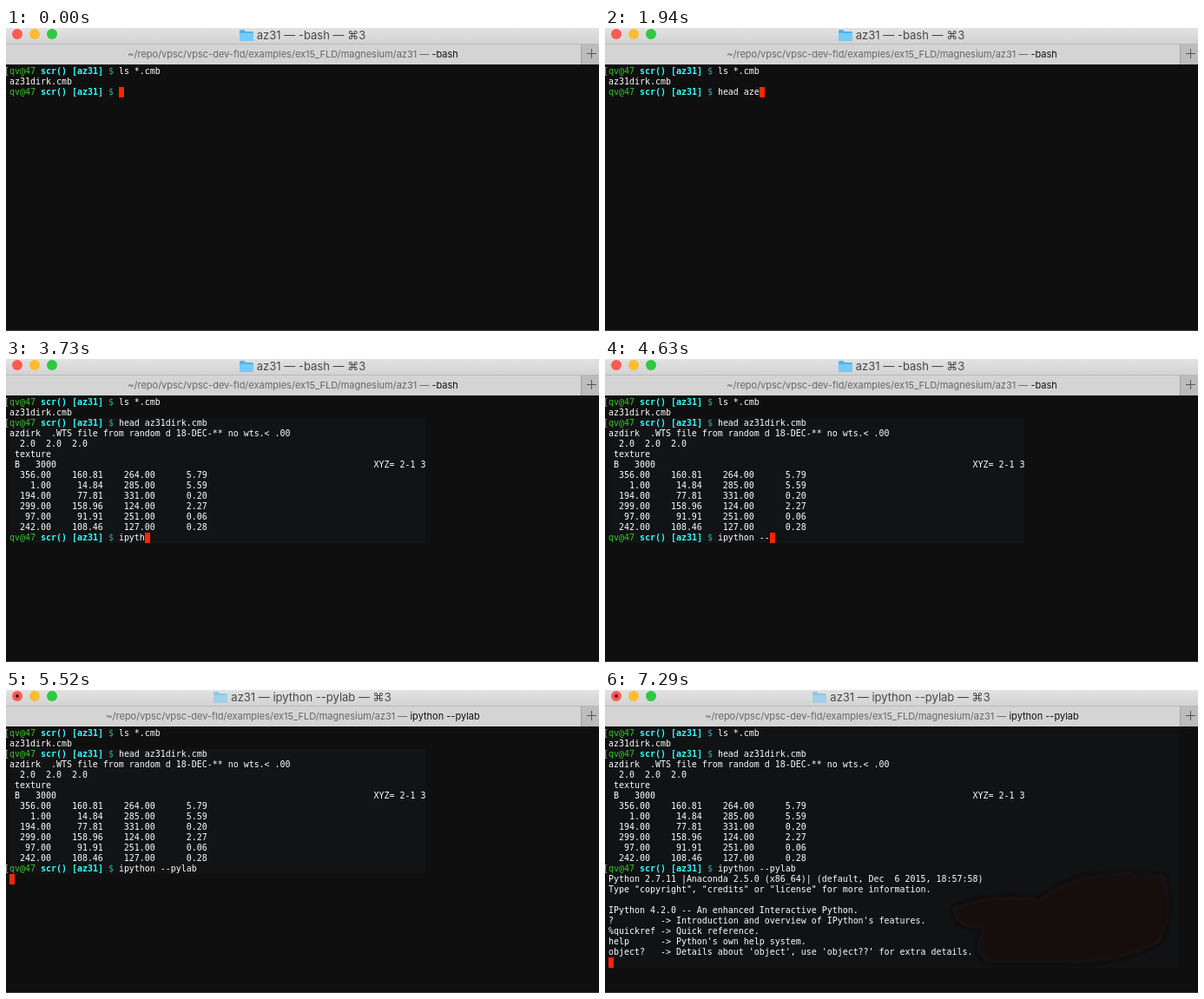
An HTML page that plays this animation: 683x349 px, repeating every 8 s.

```html
<!DOCTYPE html>
<html lang="en">
<head>
<meta charset="utf-8">
<title>Terminal session</title>
<style>
html, body { margin: 0; width: 100%; height: 100%; overflow: hidden; background: #0f0f0f; }
#window { position: absolute; left: 0; top: 0; width: 683px; height: 349px; overflow: hidden; }
svg { position: absolute; left: 0; top: 0; }
#title, #tab { position: absolute; left: 0; text-align: center; white-space: pre; font-family: Inter, "Open Sans", sans-serif; }
#title { top: -1px; width: 683px; font-size: 13px; line-height: 18px; color: #484848; }
#title svg { position: static; vertical-align: -2px; margin-right: 4px; }
#tab { top: 21px; width: 661px; font-size: 11px; line-height: 18px; color: #666; }
#tab span { color: #111; }
pre { position: absolute; left: -2px; top: 44px; margin: 0; color: #fff;
  font: 9.966px/12px "DejaVu Sans Mono", monospace; }
pre i { font-style: normal; color: #35c424; }
pre b { color: #3ff; }
pre u { text-decoration: none; color: #3aa8a8; }
pre s { text-decoration: none; color: #aaa; }
#cursor { position: absolute; width: 6px; height: 12px; background: #ff2600; }
</style>
</head>
<body>
<div id="window">
  <svg width="683" height="349">
    <defs>
      <linearGradient id="bar" x2="0" y2="1"><stop stop-color="#e2e2e2"/><stop offset="1" stop-color="#d2d2d2"/></linearGradient>
      <filter id="soft"><feGaussianBlur stdDeviation="3"/></filter>
    </defs>
    <rect width="683" height="349" fill="#0f0f0f"/>
    <rect id="patch" x="4" y="68" width="479" height="144" fill="#111315"/>
    <g id="glow">
      <rect x="4" y="42" width="656" height="278" fill="#101214"/>
      <path d="M400 252Q440 232 500 240Q550 200 645 214Q656 260 640 290Q590 318 530 314H440Q420 300 436 275Q400 275 400 252Z" fill="#170f0c" filter="url(#soft)"/>
    </g>
    <rect y="348" width="683" height="1" fill="#3c3c3c"/>
    <rect width="683" height="19" fill="url(#bar)"/>
    <rect y="19" width="683" height="23" fill="#d4d4d4"/>
    <rect y="18" width="683" height="1" fill="#bababa"/>
    <rect x="662" y="19" width="21" height="23" fill="#bcbcbc"/>
    <path d="M662.5 19V42" stroke="#a2a2a2"/>
    <path d="M669 29.5H680M674.5 24V35" stroke="#555"/>
    <circle cx="13" cy="7" r="6" fill="#fc5a55"/>
    <circle cx="33" cy="7" r="6" fill="#fdbc2f"/>
    <circle cx="53" cy="7" r="6" fill="#2fc841"/>
    <circle id="edited" cx="13" cy="7" r="2" fill="#5a0b08"/>
    <g id="spinner" stroke="#222" stroke-width="1.4" stroke-linecap="round"></g>
  </svg>
  <div id="title"><svg id="folder" width="16" height="13"><path d="M0 1.5Q0 0 1.5 0H5L7 2H14.5Q16 2 16 3.5V11.5Q16 13 14.5 13H1.5Q0 13 0 11.5Z" fill="#4fb4ea"/><path d="M0 4H16V11.5Q16 13 14.5 13H1.5Q0 13 0 11.5Z" fill="#75cbf8"/></svg><span id="name"></span></div>
  <div id="tab">~/repo/vpsc/vpsc-dev-fld/examples/ex15_FLD/magnesium/az31 — <span id="job"></span></div>
  <pre id="screen"></pre>
  <div id="cursor"></div>
</div>
<script>
const LOOP = 8000, HEAD_DONE = 2830, RUN = 5370, RETITLE = 5520, BANNER = 5970, READY = 6850;
const $ = id => document.getElementById(id);

const headKeys = [[0, ''], [590, 'h'], [740, 'hea'], [890, 'head'], [1040, 'head a'],
  [1340, 'head az'], [1490, 'head aze'], [1640, 'head azer'], [1940, 'head aze'],
  [2090, 'head az'], [2230, 'head az3'], [2380, 'head az31dirk.cmb ']];
const pylabKeys = [[0, ''], [3280, 'i'], [3430, 'ip'], [3580, 'ipyt'], [3730, 'ipyth'], [3880, 'ipython'],
  [4330, 'ipython '], [4480, 'ipython -'], [4630, 'ipython --'], [4780, 'ipython --p'],
  [4930, 'ipython --py'], [5080, 'ipython --pyl'], [5220, 'ipython --pylab']];

const table = [[356, 160.81, 264, 5.79], [1, 14.84, 285, 5.59], [194, 77.81, 331, 0.2],
  [299, 158.96, 124, 2.27], [97, 91.91, 251, 0.06], [242, 108.46, 127, 0.28]]
  .map(row => row.map((v, i) => v.toFixed(2).padStart(i ? 10 : 8)).join(''));

const fileHead = ['azdirk  .WTS file from random d 18-DEC-** no wts.&lt; .00', '  2.0  2.0  2.0', ' texture',
  ' B   3000'.padEnd(70) + 'XYZ= 2-1 3', ...table];

const banner = ['Python 2.7.11 |Anaconda 2.5.0 (x86_64)| (default, Dec  6 2015, 18:57:58)',
  'Type "copyright", "credits" or "license" for more information.', '',
  'IPython 4.2.0 -- An enhanced Interactive Python.',
  "?         -> Introduction and overview of IPython's features.",
  '%quickref -> Quick reference.',
  "help      -> Python's own help system.",
  "object?   -> Details about 'object', use 'object??' for extra details."];

const typed = (keys, t) => keys.filter(k => k[0] <= t).pop()[1];
const prompt = (cmd, entered) =>
  (entered ? '<s>[</s>' : ' ') + '<i>qv@47</i> <b>scr() [az31]</b> <u>$</u> ' + cmd;
const indent = lines => lines.map(line => ' ' + line);

function terminal(t) {
  const head = typed(headKeys, t), pylab = typed(pylabKeys, t);
  const lines = [prompt('ls *.cmb', true), ' az31dirk.cmb', prompt(head, t >= HEAD_DONE)];
  let col = 21 + head.length, row = 2;
  if (t >= HEAD_DONE) {
    lines.push(...indent(fileHead), prompt(pylab, t >= RUN));
    col = 21 + pylab.length;
    row = 13;
  }
  if (t >= RUN) { col = 0; row = 14; }
  if (t >= BANNER) {
    lines.push(...indent(banner));
    row = 22;
    if (t >= READY && t < 7290) col = 1;
  }
  return { html: lines.join('\n'), col, row };
}

for (let i = 0; i < 12; i++)
  $('spinner').innerHTML += `<path d="M0-3.7V-7" transform="rotate(${i * 30})" opacity="${0.3 + i / 16}"/>`;

const show = (id, on) => $(id).style.visibility = on ? 'visible' : 'hidden';
let last = '';

function draw(now) {
  const t = now % LOOP, { html, col, row } = terminal(t), busy = t >= RETITLE;
  if (html !== last) $('screen').innerHTML = last = html;
  $('cursor').style.left = 4 + col * 6 + 'px';
  $('cursor').style.top = 44 + row * 12 + 'px';
  const job = busy ? 'ipython --pylab' : '-bash';
  $('job').textContent = job;
  $('name').textContent = `az31 — ${job} — ⌘3`;
  $('folder').style.opacity = busy ? 0.55 : 1;
  show('edited', busy);
  show('patch', t >= HEAD_DONE);
  show('glow', t >= BANNER);
  show('spinner', t >= BANNER && t < READY);
  const turn = Math.floor((t - BANNER) / 147) * 60;
  $('spinner').setAttribute('transform', `translate(652.5 29.5) rotate(${turn})`);
  requestAnimationFrame(draw);
}
draw(0);
</script>
</body>
</html>
```
